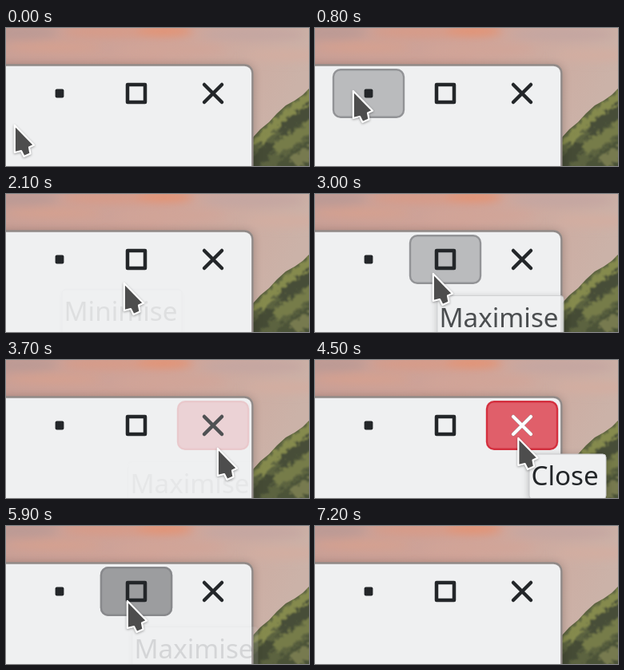
An HTML page for the animation above (7500 ms loop, 379 by 173 pixels).

```html
<!DOCTYPE html>
<html lang="en">
<head>
<meta charset="utf-8">
<title>Window buttons</title>
<style>
html, body { margin: 0; width: 100%; height: 100%; overflow: hidden; }
svg { display: block; width: 379px; height: 173px; }
.tip text { font: 33.2px "Noto Sans", sans-serif; fill: #232629; }
.tip rect { fill: #eff0f1; stroke: #c9cacc; }
.tip { filter: drop-shadow(0 2px 4px rgba(0, 0, 0, .25)); }
#cursor { filter: drop-shadow(0 1px 1.5px rgba(0, 0, 0, .35)); }
.icon { fill: none; stroke: #232629; stroke-width: 4.5; stroke-linecap: round; stroke-linejoin: round; }
.button { stroke-width: 2.4; }
</style>
</head>
<body>
<svg viewBox="0 0 379 173">
  <defs>
    <linearGradient id="sky" x2="1" y2=".25">
      <stop offset="0" stop-color="#c89f96"/>
      <stop offset=".5" stop-color="#cfa398"/>
      <stop offset="1" stop-color="#cbb2a8"/>
    </linearGradient>
    <filter id="soft" x="-50%" y="-100%" width="200%" height="300%"><feGaussianBlur stdDeviation="6"/></filter>
    <filter id="rough" x="-10%" y="-10%" width="120%" height="120%">
      <feTurbulence baseFrequency=".12" numOctaves="3" seed="4"/>
      <feDisplacementMap in="SourceGraphic" scale="14" xChannelSelector="R" yChannelSelector="G"/>
      <feGaussianBlur stdDeviation=".9"/>
    </filter>
    <clipPath id="hill"><path d="M300 146L309 137 318 127 329 118 339 107 350 97 361 91 371 84 379 76V173H300Z"/></clipPath>
  </defs>

  <rect width="379" height="173" fill="url(#sky)"/>
  <g filter="url(#soft)">
    <ellipse cx="15" cy="6" rx="50" ry="8" fill="#bb9a94"/>
    <ellipse cx="60" cy="24" rx="60" ry="5" fill="#d8a08d"/>
    <ellipse cx="130" cy="5" rx="60" ry="6" fill="#d99a85"/>
    <ellipse cx="198" cy="4" rx="36" ry="6" fill="#e6916f"/>
    <ellipse cx="205" cy="27" rx="70" ry="6" fill="#d2a497"/>
    <ellipse cx="310" cy="8" rx="65" ry="8" fill="#c4a6a1"/>
    <ellipse cx="350" cy="34" rx="50" ry="7" fill="#d3ada0"/>
  </g>
  <g clip-path="url(#hill)">
    <rect x="300" y="60" width="79" height="113" fill="#5c6340"/>
    <g filter="url(#rough)">
      <path d="M300 146L330 114 350 94 390 68V84L360 102 342 118 318 142Z" fill="#858a4e"/>
      <path d="M344 118L366 98 390 86V108L362 118 350 132 338 134Z" fill="#474e37"/>
      <path d="M332 140L352 130 390 106V124L356 144 336 156Z" fill="#767b4a"/>
      <path d="M300 160L322 140 334 146 322 166 300 180Z" fill="#454b35"/>
      <path d="M340 164L360 146 390 132V180H334Z" fill="#4c5338"/>
      <path d="M350 164L366 150 390 142V158L362 171Z" fill="#777a50"/>
    </g>
  </g>

  <rect x="-30" y="47" width="339" height="160" rx="10" opacity=".25" filter="url(#soft)"/>
  <rect x="-30" y="46.5" width="338.3" height="160" rx="10" fill="#eff0f1" stroke="#918a88" stroke-width="2.4"/>

  <g id="buttons"></g>
  <rect x="61.6" y="76.6" width="10.8" height="10.8" rx="2" fill="#232629"/>
  <rect class="icon" x="152" y="71" width="22" height="22"/>
  <path class="icon" d="M248 71l22 22m0-22l-22 22"/>
  <path class="icon" id="whiteCross" d="M248 71l22 22m0-22l-22 22" style="stroke:#fff"/>
  <g id="tips"></g>
  <path id="cursor" d="M.8 -1V33L9 31 12.5 38 20.5 34.5 19 26.5 25 23.8Z"
        fill="#4d4d4d" stroke="#fff" stroke-width="2.2" stroke-linejoin="round"/>
</svg>
<script>
const LOOP = 7500, STEP = 100;
const $ = id => document.getElementById(id);

function add(parent, tag, attrs, text = '') {
  const el = document.createElementNS('http://www.w3.org/2000/svg', tag);
  for (const k in attrs) el.setAttribute(k, attrs[k]);
  el.textContent = text;
  return parent.appendChild(el);
}

const button = (cx, fill, stroke) => add($('buttons'), 'rect',
  { class: 'button', x: cx - 44, y: 52.2, width: 88, height: 59.6, rx: 9, fill, stroke });

function tip(x, y, width, label) {
  const g = add($('tips'), 'g', { class: 'tip' });
  add(g, 'rect', { x, y, width, height: 56, rx: 4 });
  add(g, 'text', { x: x + 2.5, y: y + 39 }, label);
  return g;
}

// Rises from a to b, falls from c to d.
const pulse = (t, a, b, c, d) => Math.max(0, Math.min(1, (t - a) / (b - a), (d - t) / (d - c)));

const closeHover = [3660, 3860, 4550, 4750];
const fades = [
  [button(67, '#babbbd', '#929396'), [550, 750, 1650, 1850]],
  [button(163, '#babbbd', '#929396'), [2120, 2300, 3250, 3450]],
  [button(163, '#babbbd', '#929396'), [4900, 5000, 6200, 6400]],
  [button(163, '#9c9d9f', '#88898c'), [5550, 5700, 5950, 6150]],
  [button(259, '#e05f6a', '#d4303f'), closeHover],
  [$('whiteCross'), closeHover],
  [tip(70, 120, 150, 'Minimise'), [1300, 1500, 1750, 2130]],
  [tip(153, 127.5, 158, 'Maximise'), [2800, 3050, 3350, 3715]],
  [tip(268, 118, 96, 'Close'), [4200, 4450, 4650, 4950]],
  [tip(158, 126.5, 157, 'Maximise'), [4900, 5150, 5550, 5950]],
];

// Pointer path: time, x, y
const path = [
  [400, 10, 123], [800, 47, 80], [1000, 47, 80], [1300, 64, 94], [1500, 64, 94],
  [1800, 90, 120], [2100, 147, 113], [2300, 147, 101], [3100, 147, 101],
  [3350, 178, 122], [3600, 246, 122], [3700, 264, 112], [4000, 262, 92],
  [4450, 262, 92], [4650, 228, 120], [4900, 152, 114], [5000, 152, 101],
  [5200, 151, 95], [6000, 151, 95], [6300, 84, 124], [7000, -30, 152],
];

function pointer(t) {
  const i = path.findIndex(p => p[0] > t);
  if (i < 1) return (i ? path[path.length - 1] : path[0]).slice(1);
  const [t0, x0, y0] = path[i - 1], [t1, x1, y1] = path[i];
  const k = (t - t0) / (t1 - t0);
  return [x0 + (x1 - x0) * k, y0 + (y1 - y0) * k];
}

function draw(now) {
  const t = Math.floor(now % LOOP / STEP) * STEP;
  for (const [el, times] of fades) el.style.opacity = pulse(t, ...times);
  $('cursor').setAttribute('transform', `translate(${pointer(t)})`);
}

let start;
function frame(now) {
  start ??= now;
  draw(now - start);
  requestAnimationFrame(frame);
}
draw(0);
requestAnimationFrame(frame);
</script>
</body>
</html>
```
